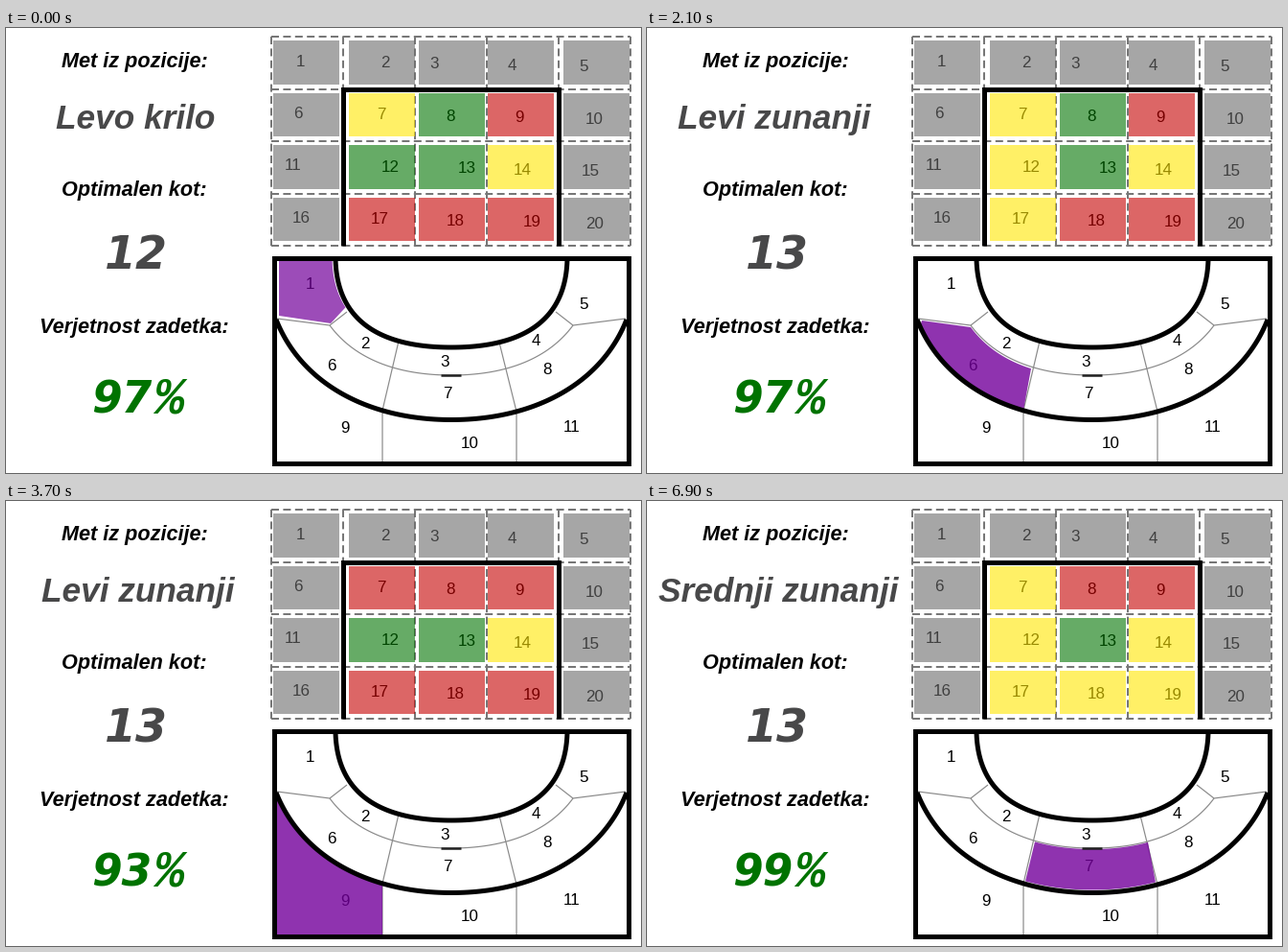
Write a matplotlib script that moves like this. It is 663x464 px and loops after 8 s.

```python
import matplotlib.pyplot as plt
import numpy as np
from matplotlib.animation import FuncAnimation
from matplotlib.patches import Polygon, Rectangle

W, H, DPI = 663, 464, 64
PX = 72 / DPI  # points per pixel
STEP, HOLD, LEAD = 100, 1600, 1100  # ms; LEAD is how far scene one has run

DIM, THIN = "#484849", "#8a8a8a"
GREY, PURPLE = "#6b6b6b", "#73009b"
TINT = {"R": "#c60000", "G": "#007300", "Y": "#ffe600"}

fig = plt.figure(figsize=(W / DPI, H / DPI), dpi=DPI, facecolor="white")
ax = fig.add_axes([0, 0, 1, 1])
ax.set(xlim=(0, W), ylim=(H, 0))
ax.axis("off")


def label(x, y, text, size, color="black", font="Liberation Sans",
          ha="center", weight="bold", style="italic"):
    return ax.text(x, y, text, fontsize=size * PX, color=color, family=font,
                   weight=weight, style=style, ha=ha, va="baseline", zorder=2)


def number(n, x, y):
    label(x, y + 6, str(n), 17, weight="normal", style="normal")


def line(points, width, color="black", z=5, **kw):
    ax.plot(*np.transpose(points), lw=width * PX, color=color, zorder=z,
            solid_capstyle="butt", solid_joinstyle="miter", **kw)


# Goal grid: 5 x 4 evenly spaced dashed boxes
LEFT, TOP, DX, DY = 277, 9, 75, 54.5
RIGHT, BOTTOM = LEFT + 5 * DX, TOP + 4 * DY
dashed = dict(width=2, color="#777777", z=1, dashes=(4, 2.2))
for r in range(5):
    line([(LEFT, TOP + r * DY), (RIGHT, TOP + r * DY)], **dashed)
for c in range(6):
    line([(LEFT + c * DX, TOP), (LEFT + c * DX, BOTTOM)], **dashed)

INSET = (2, 6, 4, 1, 5)  # left margin of the cells in each column
SHIFT = (-6, 3, -18, -9, -13, -9, -1, -1, -2, -2,
         -14, 9, 16, 2, -6, -5, -2, 4, 12, -2)  # sideways, per number

target_cells = []
for i, shift in enumerate(SHIFT):
    r, c = divmod(i, 5)
    x, y = LEFT + c * DX + INSET[c], TOP + r * DY + 4.3
    number(i + 1, x + 34.5 + shift, y + 23 + 1.4 * (c - 2))
    cell = Rectangle((x, y), 69, 45.5, fc=GREY, ec="none", alpha=0.6, zorder=3)
    ax.add_patch(cell)
    if r and 0 < c < 4:
        target_cells.append(cell)

post_l, post_r, bar = LEFT + DX, LEFT + 4 * DX, TOP + DY
line([(post_l, BOTTOM), (post_l, bar), (post_r, bar), (post_r, BOTTOM)], 5)

# Court, mirrored about MID_X
MID_X = 465


def mirrored(points):
    return [(2 * MID_X - x, y) for x, y in points]


def arch(*ctrl):
    """Cubic curve for the left half plus its mirror image."""
    t = np.linspace(0, 1, 60)[:, None]
    a, b, c, d = np.array(ctrl, float)
    half = ((1 - t) ** 3 * a + 3 * t * (1 - t) ** 2 * b
            + 3 * t ** 2 * (1 - t) * c + t ** 3 * d)
    return np.vstack([half, mirrored(half[-2::-1])])


def stretch(curve, x0, x1, dx=0, dy=0):
    """Part of a curve from x0 to x1, moved by (dx, dy)."""
    xs = np.linspace(x0, x1, 40)
    return np.column_stack([xs + dx, np.interp(xs, *curve.T) + dy])


INNER = arch((344, 240), (345, 305), (390, 333), (MID_X, 333))
MIDDLE = arch((338, 310), (360, 340), (400, 362), (MID_X, 362))
OUTER = arch((282, 304), (308, 370), (377, 408.5), (MID_X, 408.5))

line(INNER, 5)
line(OUTER, 5)
line(MIDDLE, 1.2, THIN, 1)
ax.add_patch(Rectangle((280, 239.5), 370, 214.5, fill=False, lw=5 * PX,
                       zorder=5))
line([(MID_X - 11, 362), (MID_X + 10, 362)], 2.5, "#222222")

wing = [(283, 303), (338, 310), (356, 296)]
for points in (wing, mirrored(wing)):
    line(points, 1.2, THIN, 1)
for x_in, x_out in ((410, 393), (515, 533)):
    y_in, y_out = np.interp(x_in, *INNER.T), np.interp(x_out, *OUTER.T)
    line([(x_in, y_in), (x_out, y_out), (x_out, 453)], 1.2, THIN, 1)

for n, spot in enumerate([(318, 266), (375, 328), (458, 347), (553, 325),
                          (603, 287), (340, 351), (461, 380), (565, 355),
                          (354, 416), (484, 432), (591, 415)], 1):
    number(n, *spot)


def band(upper, lower):
    return np.vstack([upper, lower[::-1]])


ZONES = {
    1: band(stretch(INNER, 344, 358, dx=-3.5),
            [(285, 243), (285, 300), (339, 308)]),
    2: band(stretch(INNER, 357, 409), stretch(MIDDLE, 340, 403, dy=-1)),
    3: band(stretch(INNER, 411, 514), stretch(MIDDLE, 405, 519, dy=-4)),
    6: band(np.vstack([[(287, 305)], stretch(MIDDLE, 338, 401, dy=2)]),
            stretch(OUTER, 285, 393)),
    7: band(stretch(MIDDLE, 405, 523, dy=1), stretch(OUTER, 395, 531, dy=-3)),
    9: band(stretch(OUTER, 283, 393), [(283, 452), (393, 452)]),
}
zone = Polygon(ZONES[1], fc=PURPLE, ec="none", zorder=3)
ax.add_patch(zone)

# Side panel
for y, text in ((41.5, "Met iz pozicije:"), (175.5, "Optimalen kot:"),
                (318, "Verjetnost zadetka:")):
    label(134, y, text, 21.6)
place = label(135, 105.3, "", 35.2, DIM)
best = label(135.5, 251, "", 47.5, DIM, "DejaVu Sans")
chance = label(152, 402, "", 45.5, font="DejaVu Sans", ha="right")
percent = label(154, 402, "%", 53, font="Liberation Mono", ha="left")

# place, its centre, best cell, chance, zone, zone opacity, cell tints
SCENES = [
    ("Levo krilo", 135, 12, 97, 1, 0.7, "YGRGGYRRR"),
    ("Levi krožni", 133.5, 12, 66, 2, 0.8, "RRRGYYRRR"),
    ("Levi zunanji", 132.5, 13, 97, 6, 0.8, "YGRYGYYRR"),
    ("Levi zunanji", 138, 13, 93, 9, 0.8, "RRRGGYRRR"),
    ("Srednji krožni", 137, 13, 40, 3, 0.8, "RRYYYYRYR"),
    ("Srednji zunanji", 137, 13, 99, 7, 0.8, "YRRYGYYYY"),
]


def update(frame):
    scene = SCENES[(frame * STEP + LEAD) // HOLD]
    name, x, best_cell, odds, zone_no, alpha, tints = scene
    place.set_text(name)
    place.set_x(x)
    best.set_text(str(best_cell))
    chance.set_text(str(odds))
    for part in (chance, percent):
        part.set_color(TINT["G" if odds > 50 else "Y"])
    zone.set_xy(ZONES[zone_no])
    zone.set_alpha(alpha)
    for cell, key in zip(target_cells, tints):
        cell.set_facecolor(TINT[key])
    return []


anim = FuncAnimation(fig, update, frames=80, interval=STEP, repeat=True,
                     repeat_delay=0, blit=False)
plt.show()
```
